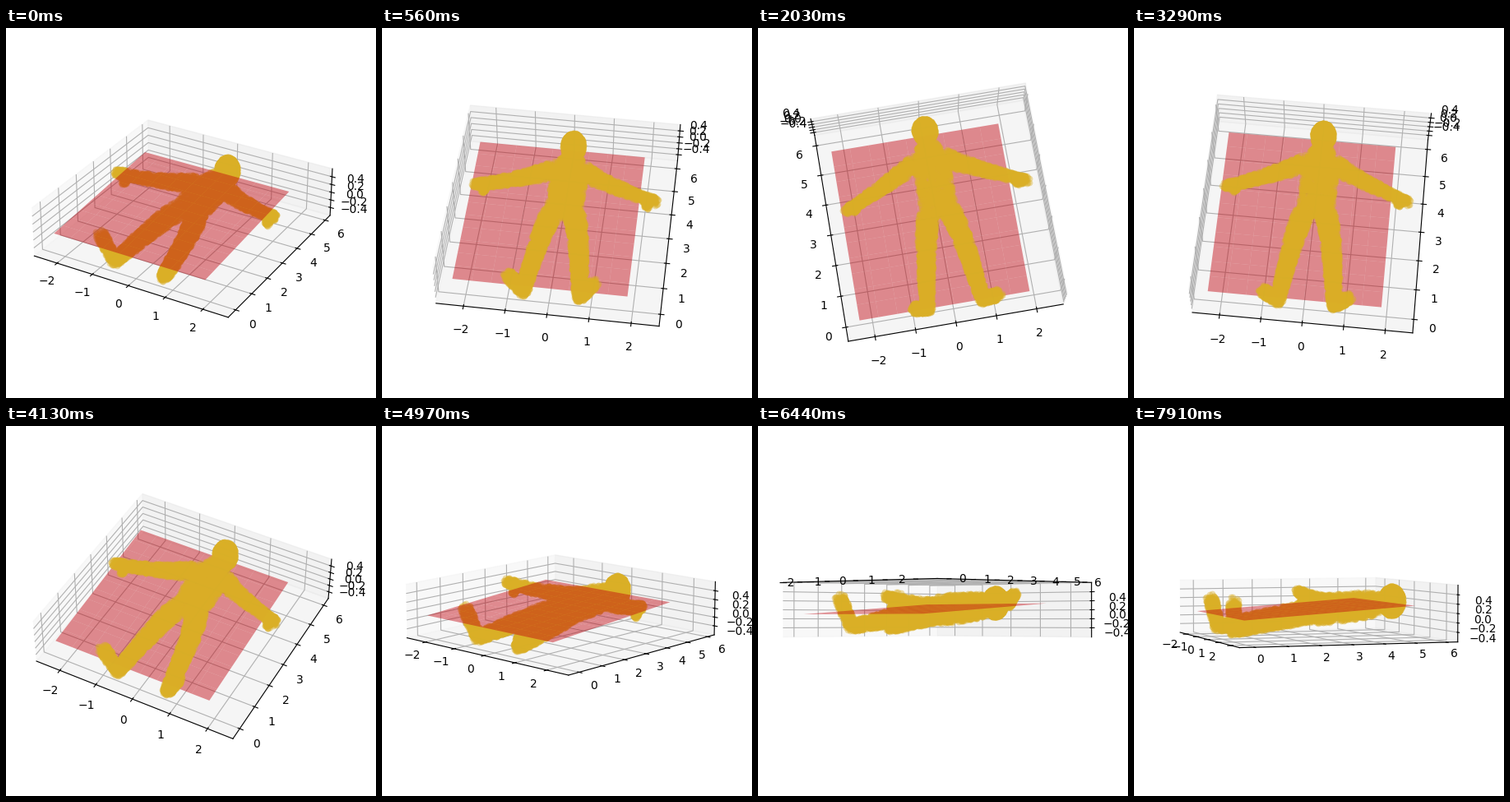
A matplotlib script that plays this animation: 450x450 px, repeating every 8000 ms.

```python
import numpy as np
import matplotlib.pyplot as plt
from matplotlib.animation import FuncAnimation

SIZE, DPI = 450, 100
LOOP, INTERVAL = 8000, 50
FIRST, STEP = 140, 210        # ms before the first camera step, ms per step
GOLD = (218 / 255, 175 / 255, 38 / 255)
RED = (0.757, 0.02, 0.06)
UNIT = np.array([50, 39, 55])  # pixels per data unit along x, y, z

# camera moves: last step, azimuth, elevation, easing power
START = (0, -60, 30)
MOVES = [
    (6, -99.5, 63.5, 0.8),
    (11, -100, 77, 0.6),
    (20, -62, 44, 1.5),
    (25, -45, 7, 0.7),
    (31, -45, -0.4, 1),
    (35, -45, -0.4, 1),
    (38, -19, 3.1, 1),
]

rng = np.random.default_rng(4)


def sweep(count, path, radius):
    """Random points on a ball (radius in pixels) swept along a path."""
    t = rng.random(count)
    n = rng.normal(size=(3, count))
    n /= np.linalg.norm(n, axis=0)
    center = np.array(np.broadcast_arrays(*path(t)))
    return center + radius(t) * n / UNIT[:, None]


def line(a, b):
    return lambda t: [p + (q - p) * t for p, q in zip(a, b)]


def taper(a, b):
    return lambda t: a + (b - a) * t


def torso_radius(t):
    return np.array([21 - 11 * (1 - t) ** 6, 9 + 0 * t,
                     17 - 6 * (1 - t) ** 6])


def body():
    head = (0, 5.56, 0.17)
    parts = [
        sweep(800, line(head, head), lambda t: np.array([[12.5], [14], [18]])),
        sweep(900, line((0, 5.15, 0.12), (0, 2.95, 0)), torso_radius),
    ]
    for s in (-1, 1):
        heel = (s * 0.68, 0.08, -0.36)
        parts += [
            # arm, thumb, leg, foot
            sweep(800, lambda t: (s * (0.38 + 1.84 * t), 4.60 - 1.25 * t,
                                  0.08 + 0.25 * t ** 2),
                  lambda t: 5 + 5.5 * (1 - t) ** 1.5),
            sweep(120, line((s * 1.97, 3.56, 0.22), (s * 2.02, 3.40, 0.08)),
                  taper(4, 3)),
            sweep(1200, lambda t: (s * (0.25 + 0.43 * t ** 0.65),
                                   2.9 - 2.82 * t, -0.02 - 0.34 * t),
                  taper(11.5, 6.5)),
            sweep(350, line(heel, (s, -0.02, 0.25)), taper(6, 6.5)),
        ]
    x, y, z = np.hstack(parts)
    return x + 0.04, y, z


def camera(step):
    s0, az0, el0 = START
    for s1, az1, el1, power in MOVES:
        if step <= s1:
            k = ((step - s0) / (s1 - s0)) ** power
            return az0 + (az1 - az0) * k, el0 + (el1 - el0) * k
        s0, az0, el0 = s1, az1, el1
    return az0, el0


fig = plt.figure(figsize=(SIZE / DPI, SIZE / DPI), dpi=DPI, facecolor="white")
ax = fig.add_axes([28 / SIZE, 36.5 / SIZE, 370 / SIZE, 370 / SIZE],
                  projection="3d", computed_zorder=False)
ax.set_box_aspect((4, 4, 1))

px, py = np.meshgrid(np.linspace(-2.3, 1.86, 10), np.linspace(0, 5.4, 12))
plane = ax.plot_surface(px, py, -0.1 + 0.045 * py, rstride=1, cstride=1,
                        color=RED, alpha=0.45, shade=False, linewidth=0)
ax.plot(*body(), "o", ms=5.6, mew=0, color=GOLD, alpha=0.4, zorder=5)

ax.set(xlim=(-2.66, 2.66), ylim=(-0.45, 6.36), zlim=(-0.605, 0.605))
ax.set_xticks(range(-2, 3))
ax.set_yticks(range(7))
ax.set_zticks([-0.4, -0.2, 0, 0.2, 0.4])


def update(i):
    t = INTERVAL * (i + 1) - 1
    azim, elev = camera(max(0, (t - FIRST) // STEP + 1))
    ax.view_init(elev=elev, azim=azim)
    # the sheet covers the body when its corner is nearest to the eye
    near = np.tan(np.radians(elev)) < 1.4 * np.cos(np.radians(azim))
    plane.set_zorder(6 if near else 4)
    return []


anim = FuncAnimation(fig, update, frames=LOOP // INTERVAL, interval=INTERVAL,
                     repeat=True, repeat_delay=0, blit=False,
                     cache_frame_data=False)
plt.show()
```
